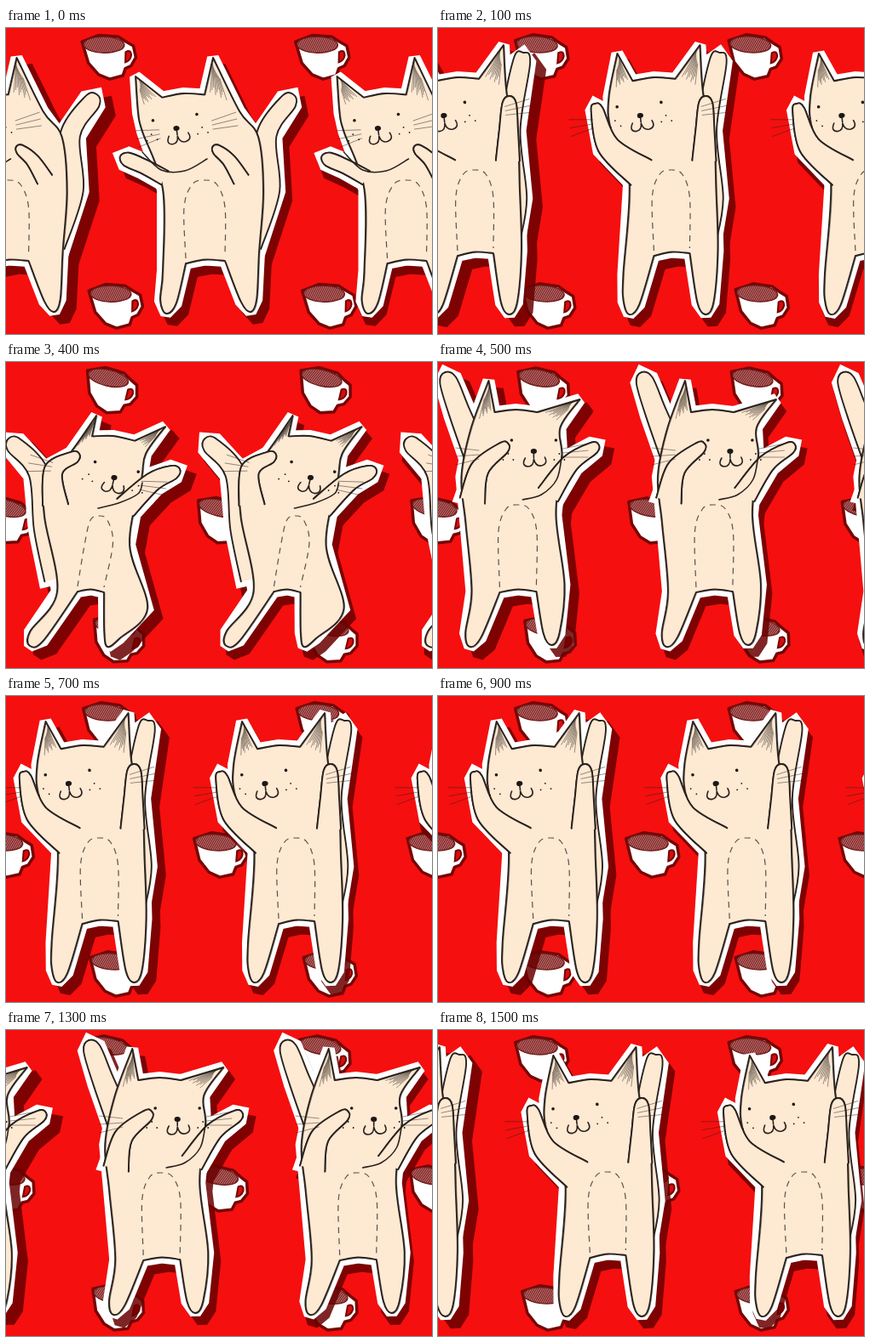
Recreate the animation shown at these times as an HTML page. Size 500x360 px, loop 1600 ms.

```html
<!DOCTYPE html>
<html lang="en">
<head>
<meta charset="utf-8">
<title>Dancing cats</title>
<style>
html, body { margin: 0; width: 100%; height: 100%; overflow: hidden; background: #f50f0f; }
svg { display: block; width: 500px; height: 360px; }
.cut { fill: #fff; stroke: #fff; stroke-width: 14; stroke-linejoin: miter; stroke-miterlimit: 1.6; }
.shade { fill: #6a0000; stroke: #6a0000; stroke-width: 14; stroke-linejoin: miter; stroke-miterlimit: 1.6; opacity: .85; }
.skin { fill: #fee9d3; stroke: #2b221d; stroke-width: 1.9; stroke-linejoin: round; stroke-linecap: round; }
.line { fill: none; stroke: #2b221d; stroke-width: 1.6; stroke-linecap: round; }
.soft { fill: none; stroke: #2b221d; stroke-width: .8; opacity: .6; }
.dash { fill: none; stroke: #5d5148; stroke-width: 1.2; stroke-dasharray: 7 6; }
.dot { fill: #1d1714; }
</style>
</head>
<body>
<svg viewBox="0 0 500 360">
  <defs id="defs"></defs>
  <rect width="500" height="360" fill="#f50f0f"/>
  <g id="cups"></g>
  <g id="shadows"></g>
  <g id="cats"></g>
</svg>
<script>
const LOOP = 1600, STEP = 100, SPEED = 11.1;
const COLS = [-1, 0, 1, 2];
const colX = k => k === 2 ? 467 : k * 230.5;
const $ = id => document.getElementById(id);

// Joints of the five drawings, from one end of the sway to the other.
// sides run neck, waist, hip; limbs run from root to tip
const poses = [
  { at: 0, col: 1, top: '208 78', turn: 10, ears: '152 57 243 35',
    left: '160 122 184 190 184 285', right: '296 128 302 192 297 264',
    crotch: '211 277 257 274', feet: '188 336 287 334', belly: '233 179',
    armL: '186 176 162 163 134 151', wL: [9, 8], armR: '276 178 262 156 243 139', wR: [10, 6],
    tail: '285 255 308 190 306 125 337 78', nose: '200 118', tilt: -8, cheek: [-20, 42],
    chin: '160 146 182 167 210 168 236 154' },
  { at: 7, col: 1, top: '320 59', turn: 2, ears: '277 30 374 20',
    left: '269 118 291 178 284 290', right: '390 122 393 190 395 262',
    crotch: '320 268 362 265', feet: '291 337 381 337', belly: '340 167',
    armL: '305 170 266 138 251 89', wL: [19, 7], armR: '379 156 380 120 381 80', wR: [14, 8],
    tail: '378 250 388 200 382 120 397 29', nose: '304 103', tilt: -6, cheek: [-56, 72] },
  { at: 2, col: 1, top: '298 56', turn: 0, ears: '249 30 347 22',
    left: '243 125 245 190 241 280', right: '352 130 351 190 358 265',
    crotch: '283 265 318 269', feet: '249 336 348 335', belly: '301 165',
    armL: '264 170 249 130 250 78', wL: [20, 11], armR: '335 165 352 115 373 66', wR: [18, 10],
    tail: '299 70 298 38 299 11', nose: '300 100', tilt: 0, cheek: [-68, 74] },
  { at: 11, col: 0, top: '158 57', turn: -4, ears: '126 22 233 44',
    left: '94 135 99 190 106 270', right: '212 112 205 180 215 262',
    crotch: '139 271 182 270', feet: '104 335 200 333', belly: '160 168',
    armL: '107 163 116 125 149 96', wL: [15, 7], armR: '196 156 222 119 255 97', wR: [14, 7],
    tail: '112 110 92 60 75 12', nose: '179 105', tilt: 0, cheek: [-64, 34],
    chin: '212 110 206 138 188 156 166 162' },
  { at: 4, col: 0, top: '126 88', turn: -18, ears: '106 63 187 76',
    left: '46 135 45 182 60 270', right: '159 138 145 215 166 290',
    crotch: '84 270 115 271', feet: '28 334 119 335', belly: '109 181',
    armL: '58 168 56 127 86 108', wL: [15, 7], armR: '140 171 172 141 204 126', wR: [14, 8],
    tail: '60 255 46 195 38 130 3 90', nose: '127 136', tilt: 13, cheek: [-74, 32],
    chin: '160 142 155 155 132 166 108 172' }
];

const pts = s => (s.match(/[\d.]+ [\d.]+/g) || []).map(p => p.split(' ').map(Number));
const mix = (a, b, t) => [a[0] + (b[0] - a[0]) * t, a[1] + (b[1] - a[1]) * t];
const add = (a, x, y) => [a[0] + x, a[1] + y];
const unit = (a, b) => {
  const x = b[0] - a[0], y = b[1] - a[1], l = Math.hypot(x, y);
  return [x / l, y / l];
};
const poly = list => 'M' + list.join('L') + 'Z';
const path = (cls, d) => `<path class="${cls}" d="${d}"/>`;
const dot = (x, y, r) => `<circle class="dot" cx="${x}" cy="${y}" r="${r}"/>`;

// curve segments through the points, without the opening move
function curve(p) {
  let d = '';
  for (let i = 0; i < p.length - 1; i++) {
    const a = p[i - 1] || p[i], b = p[i], c = p[i + 1], e = p[i + 2] || c;
    d += `C${add(b, (c[0] - a[0]) / 6, (c[1] - a[1]) / 6)} ${add(c, (b[0] - e[0]) / 6, (b[1] - e[1]) / 6)} ${c}`;
  }
  return d;
}
const smooth = p => 'M' + p[0] + curve(p);

// tapered limb, open at its root
function limb(joints, [w0, w1]) {
  const p = pts(joints), last = p.length - 1, a = [], b = [];
  p.forEach((q, i) => {
    const [x, y] = unit(p[Math.max(i - 1, 0)], p[Math.min(i + 1, last)]);
    const w = w0 + (w1 - w0) * i / last;
    const c = i === last ? add(q, -x * w, -y * w) : q;
    a.push(add(c, y * w, -x * w));
    b.unshift(add(c, -y * w, x * w));
  });
  return [...a, p[last], ...b];
}

function leg(hip, crotch, tip, side) {
  const [x, y] = unit(mix(hip, crotch, .5), tip);
  const ankle = add(tip, -x * 14, -y * 14), w = 9.5 * side;
  return [hip, add(ankle, y * w, -x * w), tip, add(ankle, -y * w, x * w), crotch];
}

// the outline in pieces that meet at sharp corners
function trunk(p) {
  const [top] = pts(p.top), [earL, earR] = pts(p.ears), [cl, cr] = pts(p.crotch);
  const [fl, fr] = pts(p.feet), left = pts(p.left), right = pts(p.right);
  const tilt = p.tilt / 5;
  const inL = add(top, -25, 2 - tilt), inR = add(top, 25, 2 + tilt);
  const outL = add(top, -53, 22), outR = add(top, 56 + p.turn, 20);
  const ear = (tip, a, b) => {
    let d = '';
    for (let i = 0; i < 10; i++) {
      const foot = mix(a, b, .15 + i * .06);
      d += `M${mix(foot, tip, .12 + i % 3 * .08)}L${mix(foot, tip, .85 - i * .03)}`;
    }
    return d;
  };
  return {
    hatch: ear(earL, inL, outL) + ear(earR, inR, outR),
    pieces: [
      [earL, inL], [inL, add(top, 0, -1), inR], [inR, earR],
      [earR, outR, right[0], right[1], ...leg(right[2], cr, fr, 1)],
      [cr, mix(cl, cr, .5).map((v, i) => v - 3 * i), cl],
      [earL, outL, left[0], left[1], ...leg(left[2], cl, fl, -1)].reverse()
    ]
  };
}

function face(p) {
  let whisk = '';
  const [l, r] = p.cheek;
  for (let j = -1; j < 2; j++)
    whisk += `M${l} ${4 + 5 * j}l-28 ${5 * j + 2}M${r} ${2 + 5 * j}l30 ${3 * j - 3}`;
  let freckles = '';
  for (const s of [-1, 1])
    for (let j = 0; j < 3; j++) freckles += dot(s * (24 + 6 * j), 10 - 7 * (j % 2), .9);
  return `<g transform="translate(${p.nose}) rotate(${p.tilt})">` +
    path('soft', whisk) + freckles + dot(-26, -13, 1.8) + dot(26, -13, 1.8) +
    path('line', 'M-10 8q-5 9 3 10q7 0 7 -9q2 9 9 8q8 -2 4 -10M0 3V8') +
    '<ellipse class="dot" rx="3.6" ry="3"/></g>';
}

function drawPose(p, n) {
  const { pieces, hatch } = trunk(p), [cl, cr] = pts(p.crotch), [b] = pts(p.belly);
  const body = 'M' + pieces[0][0] + pieces.map(curve).join('');
  const tail = limb(p.tail, [15, 10]);
  const arms = [limb(p.armL, p.wL), limb(p.armR, p.wR)];
  const half = (cr[0] - cl[0]) / 2 + 1;
  const dash = smooth([add(cl, 0, -6), add(b, -half, 32), add(b, -half * .6, 5), b,
    add(b, half * .6, 5), add(b, half, 32), add(cr, 0, -6)]);
  return `<g id="cut${n}">` + [tail, pieces.flat(), ...arms].map(q => `<path d="${poly(q)}"/>`).join('') +
    `</g><g id="art${n}">` + path('skin', smooth(tail)) + path('skin', body) +
    path('soft', hatch) + arms.map(a => path('skin', smooth(a))).join('') +
    `<g transform="translate(1 .6)">${path('soft', body)}</g>` +
    arms.map(a => path('skin', smooth(a))).join('') +
    path('dash', dash) + (p.chin ? path('line', smooth(pts(p.chin))) : '') + face(p) + '</g>';
}

function drawCup() {
  const rim = '<ellipse cx="-4" cy="-15" rx="24" ry="9.5" transform="rotate(9 -4 -15)"';
  let hatch = '';
  for (let x = -44; x < 24; x += 2.6) hatch += `M${x} 0l18 -26`;
  return `<clipPath id="rim">${rim}/></clipPath><g id="cup">` +
    '<path d="M-29 -22L-8 -27L14 -22L22 -15L30 -9L31 5L24 14L17 16L13 24L-3 26L-15 19L-25 4Z" fill="#fff" stroke="#760505" stroke-width="3.5" stroke-linejoin="round"/>' +
    '<path d="M20 -3Q27 -6 26 2Q24 8 18 9Z" fill="#d90c0c" stroke="#760505" stroke-width="2"/>' +
    rim + ' fill="#c07878" stroke="#6d1515" stroke-width="1.4"/>' +
    `<path clip-path="url(#rim)" d="${hatch}" stroke="#7c2424" stroke-width="1.2"/></g>`;
}

$('defs').innerHTML = poses.map(drawPose).join('') + drawCup();
$('shadows').innerHTML = COLS.map(() => '<use class="shade"/>').join('');
$('cats').innerHTML = COLS.map(() => '<g><use class="cut"/><use/></g>').join('');
const spots = [];
for (let c = -1; c < 3; c++)
  for (const [x, y] of [[122, 34], [252, 187], [130, 327]]) spots.push([x + 250.5 * c, y]);
$('cups').innerHTML = spots.map(() => '<use href="#cup"/>').join('');

const shades = [...$('shadows').children], cats = [...$('cats').children], cups = [...$('cups').children];
let shown = -1;

function render(ms) {
  const i = Math.floor(ms % LOOP / STEP);
  if (i === shown) return;
  shown = i;
  // the sway runs 0 1 2 3 4 3 2 1
  const n = 4 - Math.abs(i % 8 - 4), p = poses[n];
  COLS.forEach((k, j) => {
    const x = (i - p.at) * SPEED + colX(k) - colX(p.col);
    const lag = 12 - 4 * k - .3 * i;
    cats[j].setAttribute('transform', `translate(${x} 0)`);
    cats[j].children[0].setAttribute('href', '#cut' + n);
    cats[j].children[1].setAttribute('href', '#art' + n);
    shades[j].setAttribute('href', '#cut' + n);
    shades[j].setAttribute('transform', `translate(${x + lag} 10)`);
  });
  cups.forEach((cup, j) => {
    const [x, y] = spots[j];
    cup.setAttribute('transform', `translate(${x - 1 + n * .5} ${y}) rotate(${3 * n - 8})`);
  });
}

const start = performance.now();
function tick() {
  render(performance.now() - start);
  requestAnimationFrame(tick);
}
render(0);
tick();
</script>
</body>
</html>
```
